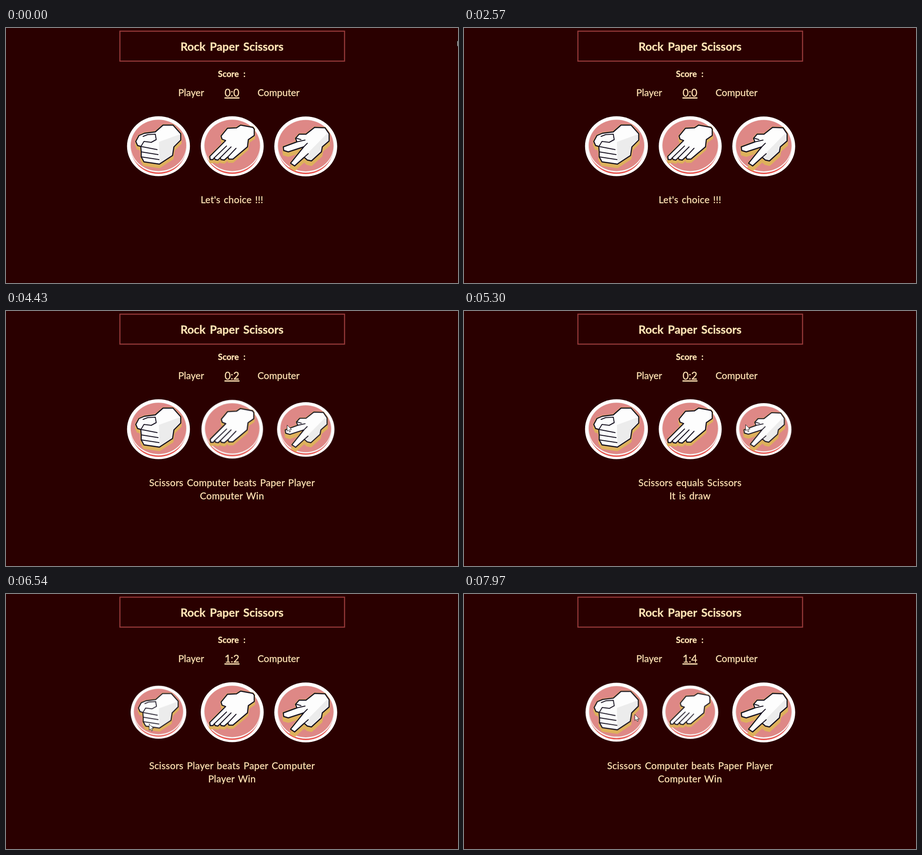
These frames come from a looping animation (996 px wide and 562 px high, 8 s). An HTML page:

```html
<!DOCTYPE html>
<html lang="en">
<head>
<meta charset="utf-8">
<title>Rock Paper Scissors</title>
<style>
  html, body { margin: 0; width: 100%; height: 100%; overflow: hidden; background: #2a0000; }
  svg { display: block; width: 100vw; height: 100vh; }

  text {
    font: 21px "Comic Sans MS", Lato, sans-serif; word-spacing: 2px; text-anchor: middle;
    fill: #ffe4b5; stroke: #ffe4b5; stroke-width: .35;
  }
  .title { font-size: 25px; font-weight: 700; word-spacing: 3.5px; }
  .heading { font-size: 18.5px; font-weight: 700; word-spacing: 5.5px; }
  .result { letter-spacing: .3px; }
  #score { font-size: 23px; text-decoration: underline 2px #fff3e0; }

  .button { transform-box: view-box; animation: 8s ease infinite; }
  #rock { transform-origin: 336px 260.5px; animation-name: rock; }
  #paper { transform-origin: 498.5px 260.5px; animation-name: paper; }
  #scissors { transform-origin: 660.5px 261px; animation-name: scissors; }

  .shadow { fill: #deb15c; stroke: #deb15c; stroke-width: 4; }
  .hand { fill: #fdfdfd; }
  .shade { fill: #ececec; }
  .line { fill: none; stroke: #15101f; stroke-width: 2.4; stroke-linejoin: round; stroke-linecap: round; }
  .crease { stroke-width: 2; }

  #cursor { animation: move 8s ease-in-out infinite; }
  #arrow { animation: arrow 8s step-end infinite; }
  #beam { animation: beam 8s step-end infinite; }

  /* Buttons shrink under the pointer over 300 ms. */
  @keyframes rock {
    0%, 36.25% { transform: scale(1); }
    40%, 43.19% { transform: scale(.88); }
    46.94%, 78.94% { transform: scale(1); }
    82.69%, 88.5% { transform: scale(.88); }
    92.25% { transform: scale(1); }
    99.18% { transform: scale(1); animation-timing-function: linear; }
    100% { transform: scale(.97); }
  }
  @keyframes paper {
    0%, 43.06% { transform: scale(1); }
    46.81%, 53.43% { transform: scale(.88); }
    57.18%, 76.9% { transform: scale(1); }
    78.1% { transform: scale(.94); }
    81%, 89% { transform: scale(1); }
    92.75% { transform: scale(.88); }
    99.29% { transform: scale(.88); animation-timing-function: linear; }
    100% { transform: scale(.902); }
  }
  @keyframes scissors {
    0%, 53.75% { transform: scale(1); }
    57.5%, 76.6% { transform: scale(.88); }
    80.35%, 100% { transform: scale(1); }
  }
  @keyframes move {
    0%, 21% { transform: translate(994px, 27px); }
    31%, 32.5% { transform: translate(424px, 146px); }
    38%, 41.8% { transform: translate(335px, 262px); }
    43.75%, 52% { transform: translate(477px, 265px); }
    55.37% { transform: translate(619px, 251px); }
    66%, 75.6% { transform: translate(620px, 250px); }
    81.2%, 87.3% { transform: translate(315px, 286px); }
    91%, 97.8% { transform: translate(490px, 268px); }
    99.62%, 100% { transform: translate(376px, 265px); }
  }
  @keyframes arrow { 0% { opacity: 1; } 30.5% { opacity: 0; } 33% { opacity: 1; } }
  @keyframes beam { 0% { opacity: 0; } 30.5% { opacity: 1; } 33% { opacity: 0; } }
</style>
</head>
<body>
<svg viewBox="0 0 996 562">
  <defs>
    <g id="disc">
      <ellipse cy="260.5" rx="69.3" ry="66" fill="#fff"/>
      <ellipse cy="262.5" rx="61.5" ry="59" fill="#e8504a"/>
      <ellipse cy="260" rx="62.5" ry="58.5" fill="#eee6e6"/>
      <ellipse cy="259.6" rx="61.5" ry="57.2" fill="#fff"/>
      <ellipse cy="258.8" rx="61.2" ry="56.6" fill="#de8886"/>
    </g>
    <path id="fist" d="M286 250 293 237 305 232 329 229 346 214H368L385 233V247L370 262 367 281 338 300 304 295 298 284V273L297 261 290 259Z"/>
    <path id="palm" d="M474 238 488 221 508 220 517 214 544 219 547 223V237L534 246 532 262 500 289 491 289 489 284 481 291 474 290 472 286 467 291 461 290 459 286 456 290H450L449 283 484 248 476 245Z"/>
    <path id="fork" d="M611 262 641 251 638 243 646 234H661L680 219 703 220 712 233V249L697 262 695 273 673 293 664 291 657 285 636 304 627 298 656 262 622 273 612 270Z"/>
  </defs>

  <rect width="996" height="562" fill="#2a0000"/>
  <rect x="251" y="7" width="495" height="66" fill="none" stroke="#963a3a" stroke-width="2.4"/>
  <text class="title" x="498" y="49.5">Rock Paper Scissors</text>
  <text class="heading" x="497.5" y="108">Score :</text>
  <text x="408" y="150">Player</text>
  <text id="score" x="498" y="151">0:0</text>
  <text x="600.5" y="150">Computer</text>

  <g class="button" id="rock">
    <use href="#disc" x="336"/>
    <use class="shadow" href="#fist" y="7"/>
    <use class="shadow" href="#fist"/>
    <use class="hand" href="#fist"/>
    <path class="shade" d="M337 251 384 234V247L370 262 367 281 338 299Z"/>
    <use class="line" href="#fist"/>
    <path class="line crease" d="M302 239 312 235 329 234 331 246 320 252 304 250 298 260M297 261 333 268M298 273 335 279M298 284 337 290"/>
  </g>

  <g class="button" id="paper">
    <use href="#disc" x="498.5"/>
    <use class="shadow" href="#palm" y="6"/>
    <use class="shadow" href="#palm"/>
    <use class="hand" href="#palm"/>
    <use class="line" href="#palm"/>
    <path class="line crease" d="M489 284 507 265M472 286 496 262M459 286 486 260"/>
  </g>

  <g class="button" id="scissors">
    <use href="#disc" x="660.5" y=".5"/>
    <use class="shadow" href="#fork" y="9"/>
    <use class="shadow" href="#fork"/>
    <use class="hand" href="#fork"/>
    <path class="shade" d="M657 284 708 232 712 235V249L697 262 695 273 673 292 664 290Z"/>
    <use class="line" href="#fork"/>
    <path class="line crease" d="M641 251 659 247M656 262 664 254M640 243 650 246M657 285 666 277"/>
  </g>

  <text class="result" id="result" x="498" y="386">Let's choice !!!</text>
  <text class="result" id="winner" x="498" y="414.5"></text>

  <g id="cursor">
    <path id="arrow" d="M.5.5V14L3.6 11.2 5.8 16 8 15 5.9 10.4H10.3Z" fill="#fff" stroke="#111" stroke-width=".9"/>
    <path id="beam" d="M-2-5H2M0-5V5M-2 5H2" fill="none" stroke="#2a0000"/>
  </g>
</svg>
<script>
  const LOOP = 8000;
  const rounds = [
    [0, "0:0", "Let's choice !!!", ""],
    [3260, "0:1", "Paper Computer beats Rock Player", "Computer Win"],
    [4040, "0:2", "Scissors Computer beats Paper Player", "Computer Win"],
    [4850, "0:2", "Scissors equals Scissors", "It is draw"],
    [5700, "1:2", "Scissors Player beats Paper Computer", "Player Win"],
    [6820, "1:3", "Paper Computer beats Rock Player", "Computer Win"],
    [7620, "1:4", "Scissors Computer beats Paper Player", "Computer Win"]
  ];
  const labels = ["score", "result", "winner"].map(id => document.getElementById(id));
  let shown;

  function update() {
    const time = performance.now() % LOOP;
    const round = rounds.findLast(([start]) => start <= time);
    if (round !== shown) {
      labels.forEach((label, i) => label.textContent = round[i + 1]);
      shown = round;
    }
    requestAnimationFrame(update);
  }
  update();
</script>
</body>
</html>
```
